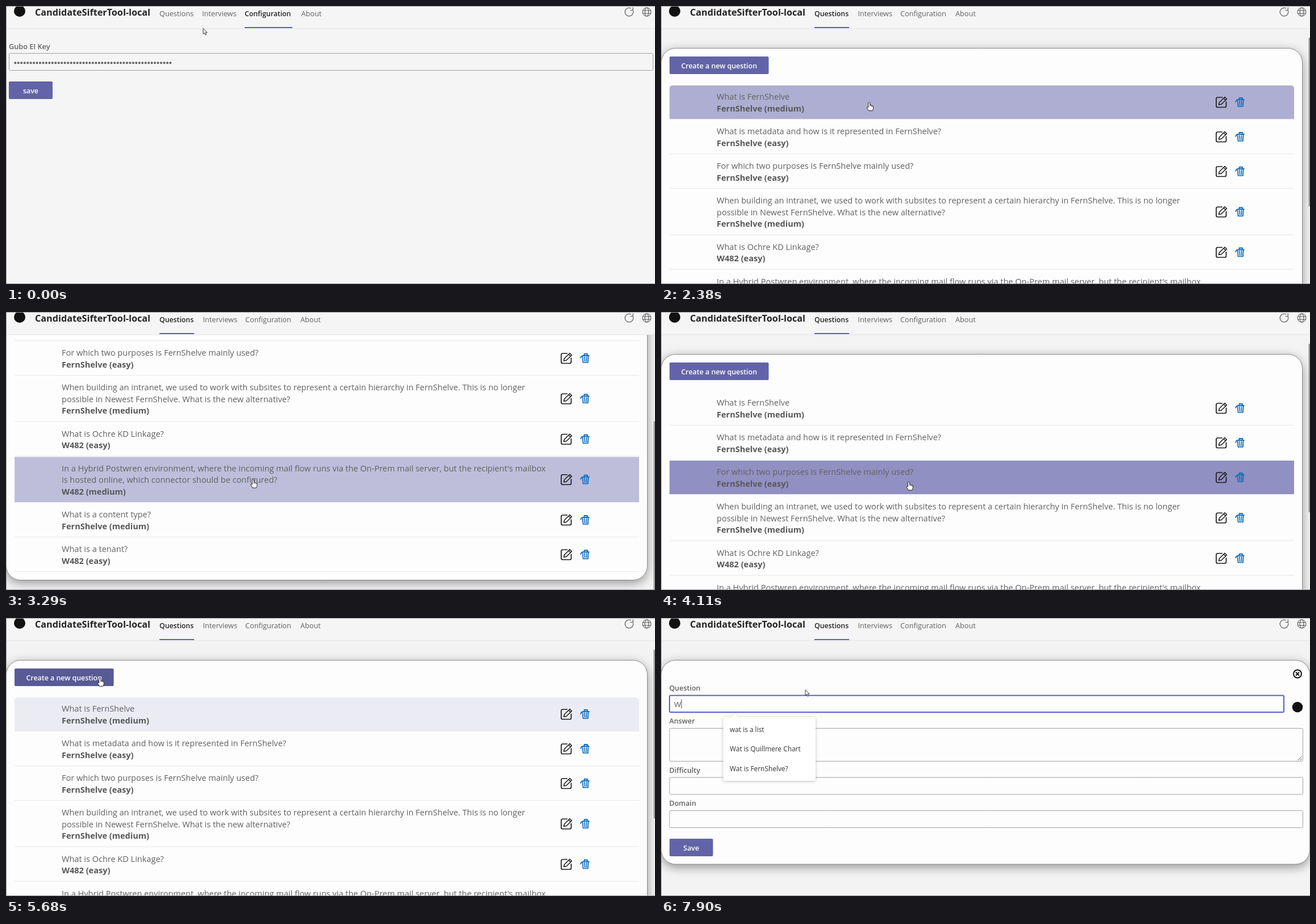
These frames come from a looping animation (1142 px wide and 490 px high, 8 s). An HTML page with a canvas:

```html
<!DOCTYPE html>
<html lang="en">
<head>
<meta charset="utf-8">
<title>Question manager</title>
<style>
  html, body { margin: 0; width: 100%; height: 100%; overflow: hidden; background: #f5f5f5; }
  canvas { display: block; width: 1142px; height: 490px; }
</style>
</head>
<body>
<canvas id="stage"></canvas>
<script>
const W = 1142, H = 490, LOOP = 8000;
const FONT = '"Open Sans", "Noto Sans", sans-serif';
const INK = '#616161', PURPLE = '#6264a7', ACCENT = '#5b5fc7', PAPER = '#fdfdfd';
const canvas = document.getElementById('stage');
const ctx = canvas.getContext('2d');
const ratio = window.devicePixelRatio || 1;
canvas.width = W * ratio;
canvas.height = H * ratio;

// Moments of the hard changes
const cut = { questions: 1160, card: 1720, list: 1870, form: 6120, focus: 6770, suggest: 6890, typed: 7900 };

// Pointer key points: time, x, y
const path = [
  [0, 347, 39], [240, 329, 25], [600, 302, 12], [1420, 308, 17], [1720, 336, 92],
  [1990, 343, 121], [2380, 366, 168], [2400, 372, 200], [2650, 410, 261], [2870, 434, 293],
  [4110, 436, 299], [4500, 437, 299], [4630, 464, 283], [4846, 375, 200], [5140, 285, 162],
  [5390, 225, 140], [5530, 178, 112], [5800, 155, 100], [6200, 157, 101], [6510, 185, 138],
  [7000, 197, 150], [7490, 254, 126], [LOOP, 254, 126]
];

const rows = [
  ['What is FernShelve', 'FernShelve (medium)'],
  ['What is metadata and how is it represented in FernShelve?', 'FernShelve (easy)'],
  ['For which two purposes is FernShelve mainly used?', 'FernShelve (easy)'],
  ['When building an intranet, we used to work with subsites to represent a certain hierarchy in FernShelve. This is no longer',
   'possible in Newest FernShelve. What is the new alternative?', 'FernShelve (medium)'],
  ['What is Ochre KD Linkage?', 'W482 (easy)'],
  ["In a Hybrid Postwren environment, where the incoming mail flow runs via the On-Prem mail server, but the recipient's mailbox",
   'is hosted online, which connector should be configured?', 'W482 (medium)'],
  ['What is a content type?', 'FernShelve (medium)'],
  ['What is a tenant?', 'W482 (easy)']
].map(lines => ({ lines, h: 61 + (lines.length - 2) * 20.5 }));

let listEnd = 139;
for (const row of rows) {
  row.top = listEnd;
  listEnd += row.h;
}

const suggestions = ['wat is a list', 'Wat is Quillmere Chart', 'Wat is FernShelve?',
  'Test question', 'How are lists used'];

const clamp = v => Math.max(0, Math.min(1, v));
const easeOut = k => 1 - (1 - clamp(k)) ** 3;

function pointerAt(t) {
  const i = Math.max(1, path.findIndex(p => p[0] >= t));
  const [t0, x0, y0] = path[i - 1], [t1, x1, y1] = path[i];
  const k = (t - t0) / (t1 - t0);
  return { x: x0 + (x1 - x0) * k, y: y0 + (y1 - y0) * k };
}

// Down to the end of the list and back up
const scrollAt = t => 210 * (easeOut((t - 2950) / 340) - easeOut((t - 3650) / 230));

// Highlights rise under the pointer and fall behind it
function hoverLevels(t) {
  const step = 10, fade = 350;
  const levels = rows.map(() => 0);
  for (let s = cut.list; s < t; s += step) {
    const y = pointerAt(s).y + scrollAt(s);
    rows.forEach((row, i) => {
      const over = y >= row.top && y < row.top + row.h;
      levels[i] = clamp(levels[i] + (over ? step : -step) / fade);
    });
  }
  return levels;
}

const overTab = p => p.y < 20 && p.x > 269 && p.x < 329;
const overCreate = p => p.y >= 89 && p.y < 120 && p.x < 189;

function text(str, x, y, size, color = INK, weight = 400, align = 'left') {
  ctx.font = `${weight} ${size}px ${FONT}`;
  ctx.fillStyle = color;
  ctx.textAlign = align;
  ctx.fillText(str, x, y);
}

function rect(x, y, w, h, color) {
  ctx.fillStyle = color;
  ctx.fillRect(x, y, w, h);
}

function box(x, y, w, h, r, fill, stroke, width = 1) {
  ctx.beginPath();
  ctx.roundRect(x, y, w, h, r);
  if (fill) { ctx.fillStyle = fill; ctx.fill(); }
  if (stroke) { ctx.strokeStyle = stroke; ctx.lineWidth = width; ctx.stroke(); }
}

function dot(x, y, r, color) {
  ctx.beginPath();
  ctx.arc(x, y, r, 0, 7);
  ctx.fillStyle = color;
  ctx.fill();
}

function ring(x, y, rx, ry, color, width = 1, from = 0, to = 2 * Math.PI) {
  ctx.beginPath();
  ctx.ellipse(x, y, rx, ry, 0, from, to);
  ctx.strokeStyle = color;
  ctx.lineWidth = width;
  ctx.stroke();
}

function line(d, color, width = 1, fill) {
  const p = new Path2D(d);
  if (fill) { ctx.fillStyle = fill; ctx.fill(p); }
  ctx.strokeStyle = color;
  ctx.lineWidth = width;
  ctx.stroke(p);
}

function at(x, y, draw) {
  ctx.save();
  ctx.translate(x, y);
  draw();
  ctx.restore();
}

function shadowed(alpha, blur, drop, draw) {
  ctx.save();
  ctx.shadowColor = `rgba(0,0,0,${alpha})`;
  ctx.shadowBlur = blur * ratio;
  ctx.shadowOffsetY = drop * ratio;
  draw();
  ctx.restore();
}

function button(label, x, y, w, fill = PURPLE) {
  box(x, y, w, 31, 2, fill);
  text(label, x + w / 2, y + 20.5, 12.4, '#fff', 600, 'center');
}

function card(w, h) {
  shadowed(0.4, 18, 5, () => box(0.5, 74.5, w, h, 25, PAPER));
  box(0.5, 74.5, w, h, 25, null, '#8c8c8c');
}

function header(t, p) {
  const onQuestions = t >= cut.questions;
  const active = onQuestions ? 0 : 2;
  const tabs = ['Questions', 'Interviews', 'Configuration', 'About'];
  const xs = onQuestions ? [270, 346.5, 421, 518] : [270, 345, 420, 519.5];
  const gray = '#4a4a4a';
  rect(0, 0, W, 40, '#f5f5f5');
  rect(0, 39.5, W, 1, '#e3e3e3');
  dot(24, 9, 10, '#111');
  text('CandidateSifterTool-local', 51, 16.5, 16.2, '#242424', 700);
  tabs.forEach((name, i) => {
    const on = i === active;
    text(name, xs[i], 17.5, on ? 12.3 : 12.7, on ? '#242424' : INK, on ? 600 : 400);
  });
  if (!onQuestions && overTab(p)) rect(270, 37, 59, 2, '#d1d1d1');
  rect(xs[active], 37, onQuestions ? 61 : 84, 2, ACCENT);

  at(1096.5, 10.5, () => {
    ring(0, 0, 7.3, 7.3, gray, 1.1, -0.3, 5.2);
    line('M6.8-8V-3H2', gray, 1.1);
  });
  at(1127.5, 10.5, () => {
    ring(0, 0, 7.5, 7.5, gray);
    ring(0, 0, 3.4, 7.5, gray);
    line('M-7-2.5H7M-7 2.5H7', gray);
  });
}

function configuration() {
  text('Gubo EI Key', 5, 75.5, 12.7, INK, 600);
  box(5.5, 83.5, 1133, 30, 2, null, '#a0a0a0');
  for (let i = 0; i < 51; i++) dot(16.3 + i * 5.46, 100.3, 1.95, INK);
  button('save', 5, 133, 77);
}

function editIcon(x, y) {
  at(x, y, () => {
    line('M2-8.5H-6.5Q-9-8.5-9-6V6.5Q-9 9-6.5 9H6Q8.5 9 8.5 6.5V-1', '#1a1a1a', 1.7);
    line('M-4.5 4.5L-3.5 .5L6-9L9.5-5.5L0 3.8ZM4-7L7.5-3.5', '#1a1a1a', 1.5);
  });
}

function trashIcon(x, y) {
  at(x, y, () => {
    line('M-7.5 0Q-6.5-4.5-2-4.5H8M-1-5V-7.5H4.5V-5', '#0f6cbd', 1.8);
    line('M-3.8-3L-3 7.5H5.5L6.3-4M-.4-3L0 6M3.2-3L2.9 6', '#0f6cbd', 1.7);
  });
}

function questionList(t, p) {
  const empty = t < cut.list;
  const scroll = scrollAt(t);
  ctx.save();
  ctx.beginPath();
  ctx.rect(0, 40, W, H - 40);
  ctx.clip();
  ctx.translate(0, -scroll);
  card(empty ? 1141 : 1128, empty ? 71 : listEnd - 60);
  button('Create a new question', 15, 89, 174.5, overCreate(p) ? '#585a96' : PURPLE);
  if (!empty) {
    const levels = hoverLevels(t);
    rows.forEach(({ lines, top, h }, i) => {
      rect(15, top + h - 1, 1099, 1, '#e8e8e8');
      ctx.globalAlpha = levels[i];
      box(15, top + 1, 1099, h - 2, i ? 0 : [5, 5, 0, 0], '#9090c2');
      ctx.globalAlpha = 1;
      lines.forEach((str, n) => {
        const bold = n === lines.length - 1;
        text(str, 98, top + 26 + n * 20.5, 14.53, bold ? '#575757' : INK, bold ? 700 : 400);
      });
      editIcon(986, top + h / 2);
      trashIcon(1018.5, top + h / 2);
    });
  }
  ctx.restore();
  if (!empty) rect(1139.5, 56 + scroll * 0.65, 2.5, 297, '#999');
}

function field(label, y, w, h, stroke = '#a3a3a3', width = 1) {
  text(label, 14.5, y - 8.5, 12.5, INK, 600);
  box(15, y, w, h, 2, PAPER, stroke, width);
}

function dropdown(count) {
  shadowed(0.25, 5, 1, () => box(109.5, 174.5, 162.5, 9 + count * 34.5, 3, '#fff'));
  line('M122 174.5L130 167.5L138 174.5', '#dcdcdc', 1, '#fff');
  suggestions.slice(0, count).forEach((s, i) => text(s, 121, 200.5 + i * 34.5, 11.9, '#333'));
}

function form(t, p) {
  const focused = t >= cut.focus, typed = t >= cut.typed;
  card(1141, 359.5);
  at(1120, 98.5, () => {
    ring(0, 0, 7, 7, '#111', 2);
    line('M-3-3L3 3M3-3L-3 3', '#111', 2);
  });
  const border = focused ? ACCENT : p.y > 136 ? '#777' : '#a3a3a3';
  field('Question', 136.5, 1081, 29.5, border, focused ? 2 : 1);
  dot(1120, 157, 9.3, '#111');
  field('Answer', 194.5, 1114.5, 58);
  line('M1120.5 251L1127.5 244M1124.5 251L1127.5 248', '#555');
  field('Difficulty', 281, 1114.5, 30);
  field('Domain', 339.5, 1114.5, 30);
  button('Save', 15, 389, 76.5);
  if (typed) text('W', 23, 157, 13.4);
  if (focused) rect(typed ? 35.5 : 23, 143.5, 1, 16, '#444');
  if (t >= cut.suggest) dropdown(typed ? 3 : 5);
}

function pointer(t, p) {
  const onForm = t >= cut.form, onList = t >= cut.list && !onForm;
  ctx.lineJoin = 'round';
  at(p.x, p.y, () => {
    if (onForm && p.y >= 136) {
      line('M-3-5.5H-1L0-4.5L1-5.5H3M0-4.5V4.5M-3 5.5H-1L0 4.5L1 5.5H3', '#333');
    } else if (overTab(p) || onList && (p.y >= 140 || overCreate(p))) {
      line('M-1.5 1.2Q0-.8 1.5 1.2V5Q3 4.4 3.7 5.6Q5 5.2 5.6 6.3Q7.3 6.3 7.2 8V10.5Q7 12.5 5.8 15H-.8Q-1.5 13-4 9.8Q-4.6 7.6-1.5 9Z', '#222', 1, '#fff');
      line('M1.5 5V8M3.7 5.8V8M5.6 6.5V8.3', '#222', 0.7);
    } else {
      line('M0 .5V10.5L2.3 8.4L4 12L5.7 11.2L4.1 7.8H7.2Z', '#333', 1, '#fff');
    }
  });
}

function draw(t) {
  const p = pointerAt(t);
  ctx.setTransform(ratio, 0, 0, ratio, 0, 0);
  ctx.lineJoin = 'round';
  rect(0, 0, W, H, t < cut.card ? '#f5f5f5' : '#f3f3f3');
  if (t < cut.questions) configuration();
  else if (t >= cut.form) form(t, p);
  else if (t >= cut.card) questionList(t, p);
  header(t, p);
  rect(0, 0, W, 1, '#999');
  rect(0, 0, 1, H, '#999');
  rect(0, H - 1, W, 1, '#999');
  pointer(t, p);
}

const start = performance.now();
function tick() {
  draw((performance.now() - start) % LOOP);
  requestAnimationFrame(tick);
}
tick();
</script>
</body>
</html>
```
